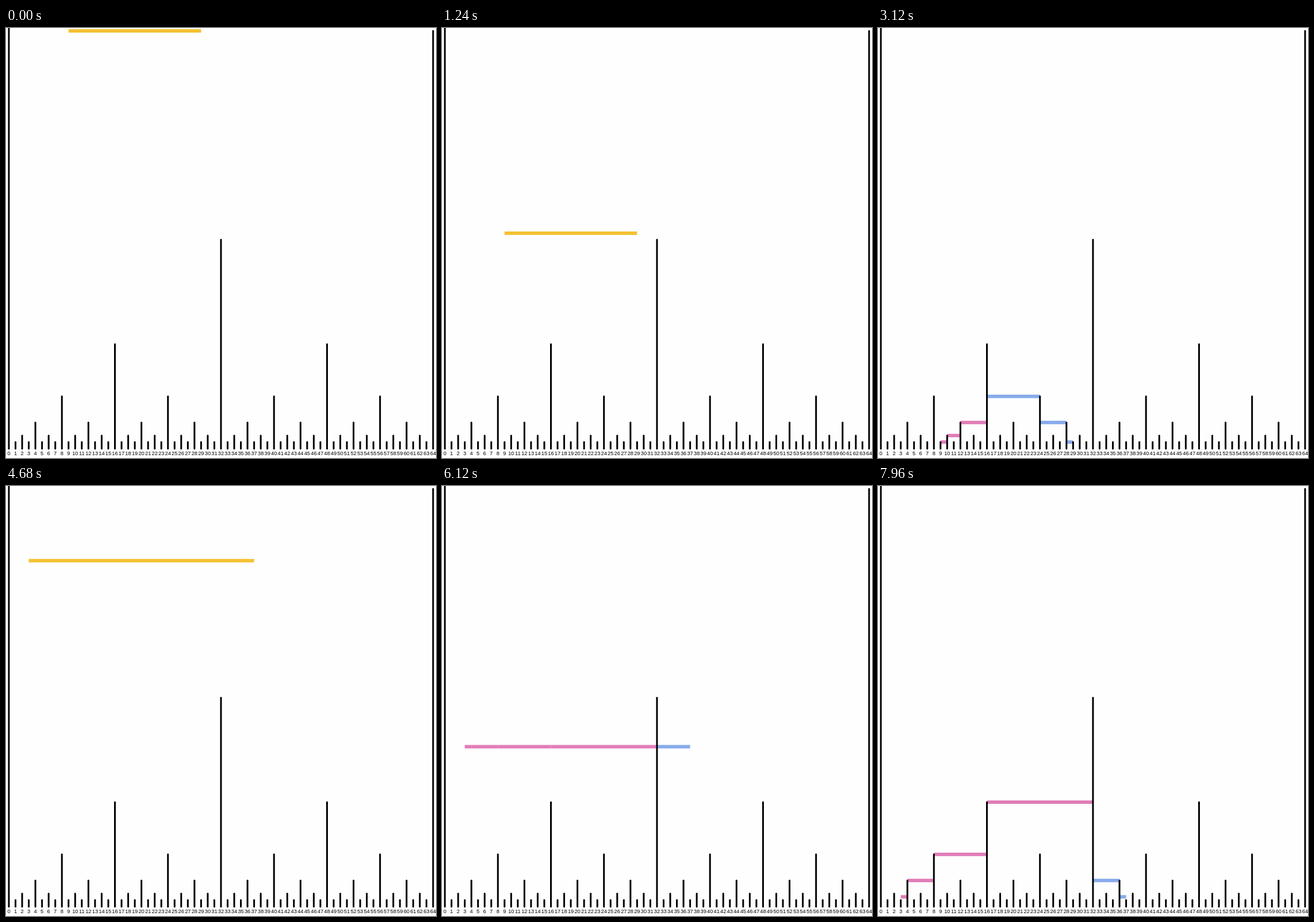
An HTML page with a canvas that plays this animation: 748x748 px, repeating every 8 s.

```html
<!DOCTYPE html>
<html>
<head>
<meta charset="utf-8">
<style>
html, body { margin: 0; width: 100%; height: 100%; overflow: hidden; background: #fefefe; }
canvas { display: block; }
</style>
</head>
<body>
<canvas width="748" height="748"></canvas>
<script>
const ctx = document.querySelector('canvas').getContext('2d');
const STEP = 40, LOOP = 8000, SECOND = 4240;
const YELLOW = '#f4c232', PINK = '#e17db7', BLUE = '#87abec';

const xOf = n => 5 + n * 11.53;
const yOf = h => 731.65 - h * 11.354;
// Largest power of two dividing n; zero rises past the top edge.
const level = n => n ? n & -n : 128;

function bar(from, to, height, color) {
  ctx.fillStyle = color;
  ctx.fillRect(xOf(from), yOf(height) - 3, xOf(to) - xOf(from), 6);
}

// The range falls whole to its tallest tick, then splits and sinks at half speed.
function drawRange(from, to, split, steps) {
  const full = 64 - steps;
  if (full > split) return bar(from, to, full, YELLOW);
  const height = split - (split - full) / 2;

  for (let a = from; a < split;) {
    const size = level(a);
    bar(a, a + size, Math.max(size, height), PINK);
    a += size;
  }
  for (let a = split; a < to;) {
    const size = 2 ** Math.floor(Math.log2(to - a));
    bar(a, a + size, Math.max(size, height), BLUE);
    a += size;
  }
}

function drawRuler() {
  ctx.strokeStyle = ctx.fillStyle = '#000';
  ctx.lineWidth = 3;
  ctx.lineCap = 'round';
  ctx.font = '9.3px "Liberation Sans", Arial, sans-serif';
  ctx.textAlign = 'center';
  for (let n = 0; n <= 64; n++) {
    ctx.beginPath();
    ctx.moveTo(xOf(n), yOf(0));
    ctx.lineTo(xOf(n), yOf(level(n)));
    ctx.stroke();
    ctx.fillText(n, xOf(n), 743.3);
  }
}

const start = performance.now();

function draw() {
  const time = Math.max(0, performance.now() - start) % LOOP;
  const tick = Math.floor(time / STEP);
  const turn = SECOND / STEP;
  ctx.fillStyle = '#fefefe';
  ctx.fillRect(0, 0, 748, 748);
  if (tick < turn) drawRange(9, 29, 16, Math.min(tick, 78));
  else drawRange(3, 37, 32, tick - turn);
  drawRuler();
  requestAnimationFrame(draw);
}
draw();
</script>
</body>
</html>
```
